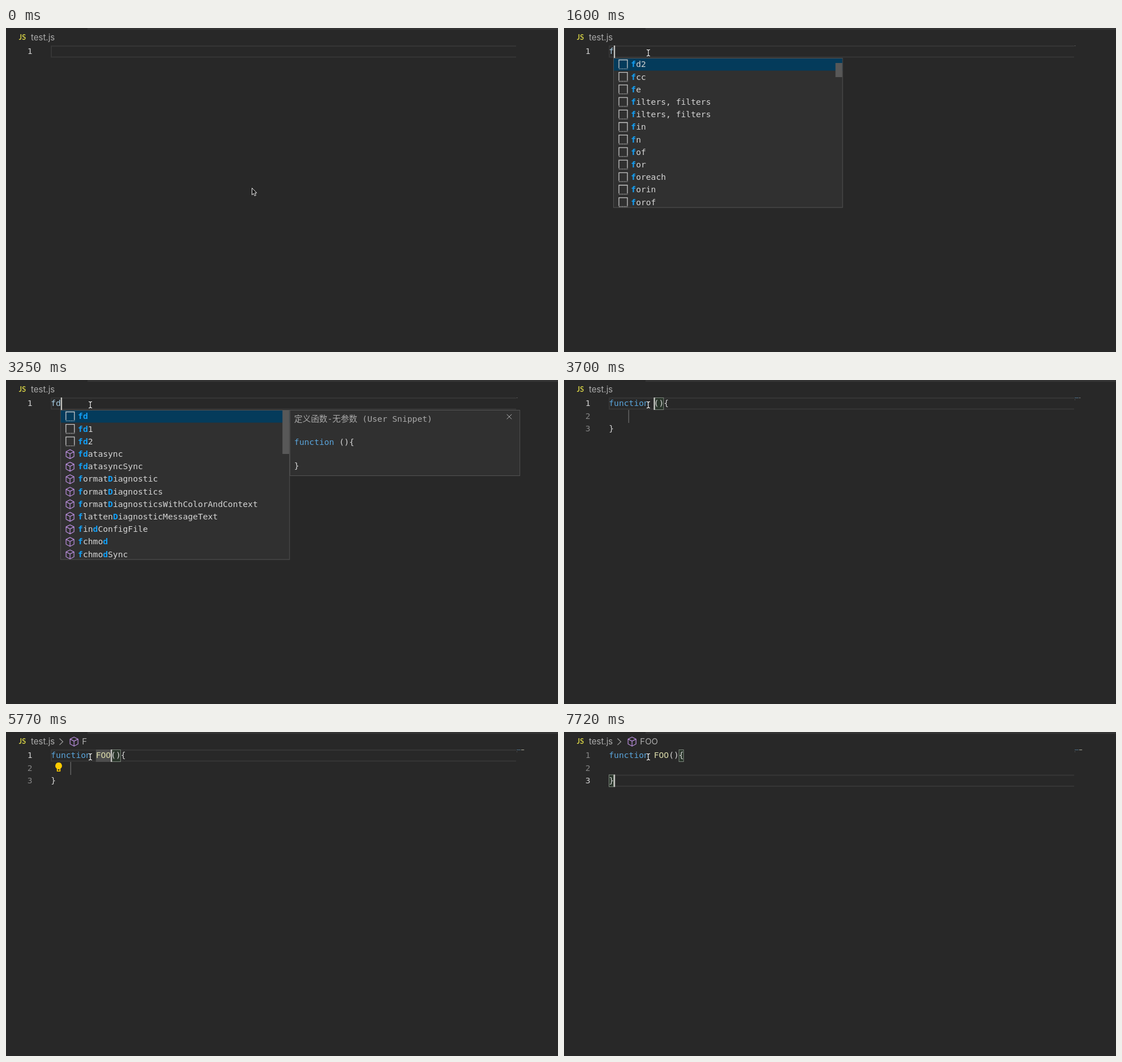
Animation, 975 px wide and 574 px high, one loop 8 s. Source, as an HTML page:

```html
<!DOCTYPE html>
<html lang="en">
<head>
<meta charset="utf-8">
<title>Snippet completion</title>
<style>
  html, body { margin: 0; width: 100%; height: 100%; overflow: hidden; background: #282828; }
  svg { display: block; }
  text { white-space: pre; fill: #d4d4d4; font: 14.67px "DejaVu Sans Mono", "Noto Sans CJK SC", "Noto Sans CJK", monospace; }
  .ui { font: 15px Inter, sans-serif; fill: #adadad; }
  .js { font: bold 12.5px Lato, sans-serif; fill: #d3cf45; }
  .num { fill: #858585; }
  .num.on { fill: #d0d0d0; }
  .key { fill: #5aa5dc; }
  .var { fill: #a9cfe6; }
  .name { fill: #dcdcaa; }
  .hit { fill: #12a0f7; font-weight: bold; }
  .note { fill: #a9a9a9; }
  .line { fill: none; stroke: #363636; stroke-width: 2; }
  .match { fill: #29352a; stroke: #7d877d; }
  .caret { fill: #c4c4c0; }
  .panel { fill: #303030; stroke: #525252; }
  .cube { fill: none; stroke: #b48ad6; stroke-width: 1.3; stroke-linejoin: round; }
  .snip { fill: none; stroke: #c8c8c8; stroke-width: 1.3; }
</style>
</head>
<body>
<svg id="stage" width="975" height="574" viewBox="0 0 975 574"></svg>
<script>
const LOOP = 8000, CELL = 8.83, ROW = 22.2;
const col = n => 79.3 + n * CELL;
const rowTop = r => 31 + r * ROW;
const base = r => 46.3 + r * ROW;

// Times are start-end pairs in ms, separated by spaces.
const at = (times, body) => `<g data-t="${times}">${body}</g>`;
const text = (x, y, body, cls = '') => `<text x="${x}" y="${y}" class="${cls}">${body}</text>`;
const span = (cls, s) => `<tspan class="${cls}">${s}</tspan>`;
const rect = (x, y, w, h, attrs) => `<rect x="${x}" y="${y}" width="${w}" height="${h}" ${attrs}/>`;
const fill = color => `fill="${color}"`;

const cube = (x, y) => `<path class="cube" transform="translate(${x} ${y})"
  d="M0-8 7-4.4V4.2L0 8-7 4.2V-4.4ZM-7-4.4 0-.8 7-4.4M0-.8V8"/>`;
const snip = (x, y) => `<g class="snip"><path d="M${x} ${y + 14.5}V${y}h15v14.5"/>
  <path d="M${x} ${y + 15.8}h15.5" stroke-dasharray="1.5 1.4"/></g>`;
const caret = (times, r, c) => at(times, rect(col(c) - .2, rowTop(r), 2.3, 22, 'class="caret"'));
const match = (r, c, n) => rect(col(c) + .2, rowTop(r) + .5, n * CELL - .8, 21, 'class="match"');

function lineState(r, active, shown) {
  const y = rowTop(r);
  return at(shown, text(37.8, base(r), r + 1, 'num')) +
    at(active, `<path class="line" d="M901 ${y + 1}H80V${y + 20.5}H901"/>` +
      text(37.8, base(r), r + 1, 'num on'));
}

// Matched letters are wrapped in asterisks.
function list(x, items, snippets, thumbY, thumbH) {
  const rows = items.split('|').map((s, i) => {
    const y = 53.5 + i * ROW;
    const icon = i < snippets ? snip(x + 10, y + 3) : cube(x + 17.3, y + 11.3);
    return icon + text(x + 31.3, y + 15.9, s.replace(/\*(.+?)\*/g, (_, m) => span('hit', m)));
  }).join('');
  return rect(x + .5, 53.5, 404.5, 264.5, 'class="panel"') +
    rect(x + 1, 54, 403.5, 21.5, fill('#043b5b')) +
    `<g clip-path="url(#listClip)">${rows}</g>` +
    rect(x + 392.5, thumbY, 12, thumbH, fill('#585858'));
}

function docs(x, title, args) {
  return rect(x + .5, 53.5, 406, 116, 'class="panel"') +
    text(x + 8, 74, title + ' (User Snippet)', 'note') +
    text(x + 8, 115.3, span('key', 'function') + ` (${args}){`) +
    text(x + 8, 157.3, '}') +
    `<path d="M${x + 383.5} 60.8l8.5 8.5m0-8.5l-8.5 8.5" stroke="#b5b5b5" fill="none"/>`;
}

const arrow = (times, x, y) => at(times, `<path transform="translate(${x} ${y})" fill="#111" stroke="#eee"
  d="M0 0V12.2L2.8 9.6 4.7 13.8 6.9 12.8 5 8.7H8.4Z"/>`);
const beam = (times, x, y) => at(times, ['#111', '#f2f2f2'].map((c, i) =>
  `<path transform="translate(${x} ${y})" fill="none" stroke="${c}" stroke-width="${i ? 1.3 : 2.8}"
  d="M-3-5.6Q0-5.6 0-3.8Q0-5.6 3-5.6M0-4V4M-3 5.6Q0 5.6 0 3.8Q0 5.6 3 5.6"/>`).join(''));

function header() {
  const crumb = `<path d="M94.5 11.5l6 5.7-6 5.7" fill="none" stroke="#9a9a9a" stroke-width="1.3"/>` + cube(120.2, 17);
  return rect(144, 0, 831, 3.3, fill('#343434')) +
    text(22.8, 20.6, 'JS', 'js') + text(44, 22, 'test.js', 'ui') +
    at('5770-8000', crumb) +
    at('5770-6070', text(134.3, 22, 'F', 'ui')) +
    at('6070-8000', text(134.3, 22, 'FOO', 'ui'));
}

function code() {
  const names = [['', 3700, 5190], ['F', 5190, 5480], ['FO', 5480, 5620], ['FOO', 5620, 8000]];
  const first = names.map(([s, from, to]) => {
    const n = s.length;
    return at(`${from}-${Math.min(to, 7120)}`, match(0, 9 + n, 2)) +
      at(`${from}-${to}`,
        text(col(0), base(0), span('key', 'function') + ' ' + span('name', s) + '(){') +
        rect(902, 31, 7, 1.2, fill('#48657a')) +
        rect(910, 31, 2.2 + n, 1.2, fill(n ? '#99998a' : '#777')) +
        rect(902, 34.3, 1, 1.2, fill('#666')));
  }).join('');
  return at('5770-7120', rect(col(9), rowTop(0), 3 * CELL, 22, fill('#4d4d4d'))) +
    at('7720-8000', match(0, 14, 1) + match(2, 0, 1)) +
    at('1450-3250', text(col(0), base(0), 'f', 'var')) +
    at('3250-3700', text(col(0), base(0), 'fd', 'var')) +
    at('1450-3700', rect(902, 31, 1.2, 1, fill('#777'))) +
    first +
    at('3700-8000', text(col(0), base(2), '}')) +
    at('3700-7570', rect(113.7, 53, 1.2, 23, fill('#707070'))) +
    at('5770-7270', `<path fill="#fc0" d="M93 54a6 6 0 0 1 3.2 11V70h-6.4V65A6 6 0 0 1 93 54Z"/>` +
      rect(91.6, 66, 2.8, 2.6, fill('#282828')));
}

const carets = [
  ['1020-1450', 0, 0], ['1450-1900 2500-2950', 0, 1], ['3250-3700', 0, 2],
  ['3700-4140 4740-5190', 0, 9], ['5190-5480', 0, 10], ['5480-5620', 0, 11],
  ['5620-6220 6670-6970', 0, 12], ['6970-7570', 1, 4], ['7570-8000', 2, 1]
];

const stage = document.getElementById('stage');
stage.innerHTML =
  '<clipPath id="listClip"><rect x="80" y="54" width="430" height="264"/></clipPath>' +
  header() +
  lineState(0, '0-6970', '6970-8000') +
  lineState(1, '6970-7570', '3700-6970 7570-8000') +
  lineState(2, '7570-8000', '3700-7570') +
  code() +
  carets.map(c => caret(...c)).join('') +
  at('1600-3250', list(87,
    '*f*d2|*f*cc|*f*e|*f*ilters, filters|*f*ilters, filters|*f*in|*f*n|*f*of|*f*or|*f*oreach|*f*orin|*f*orof',
    12, 62, 25)) +
  at('1750-3250', docs(492.3, '定义函数-两个参数', ' , ')) +
  at('3250-3700', list(95.8,
    '*fd*|*fd*1|*fd*2|*fd*atasync|*fd*atasyncSync|*f*ormat*D*iagnostic|*f*ormat*D*iagnostics|' +
    '*f*ormat*D*iagnosticsWithColorAndContext|*f*latten*D*iagnosticMessageText|' +
    '*f*in*d*ConfigFile|*f*chmo*d*|*f*chmo*d*Sync', 3, 54, 77) +
    docs(501.1, '定义函数-无参数', '')) +
  arrow('0-150', 434.5, 283.5) + arrow('150-297', 412, 262) +
  arrow('297-443', 310, 170) + arrow('443-590', 190, 78) +
  beam('590-890', 153, 49.5) + beam('890-8000', 149, 44);

const parts = [...stage.querySelectorAll('[data-t]')].map(el => ({
  el, spans: el.dataset.t.split(' ').map(s => s.split('-').map(Number))
}));

const start = performance.now();
function draw() {
  const t = (performance.now() - start) % LOOP;
  for (const { el, spans } of parts) {
    el.style.display = spans.some(([a, b]) => t >= a && t < b) ? '' : 'none';
  }
  requestAnimationFrame(draw);
}
draw();
</script>
</body>
</html>
```
